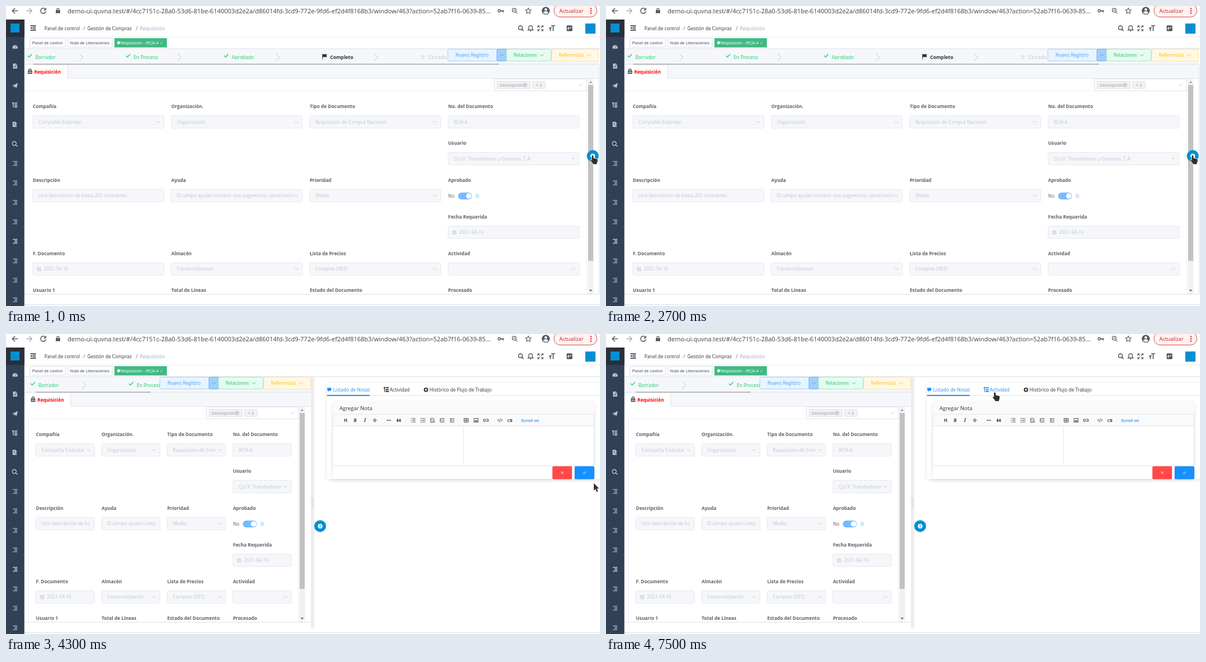
Animation, 1052 px wide and 532 px high, one loop 8000 ms. Source, as an HTML page with a canvas:

```html
<!DOCTYPE html>
<html lang="es">
<head>
<meta charset="utf-8">
<title>Requisición</title>
<style>
html, body { margin: 0; width: 100%; height: 100%; overflow: hidden; background: #fff; }
canvas { display: block; }
</style>
</head>
<body>
<canvas id="stage" width="1052" height="532"></canvas>
<script>
const ctx = document.getElementById('stage').getContext('2d');
const LOOP = 8000;
const SANS = '"Open Sans", "Noto Sans", sans-serif';
const ARIAL = '"Liberation Sans", Arial, sans-serif';
const BLUE = '#1890ff', GREEN = '#13ce66', AMBER = '#ffba00', ACCENT = '#008fd3';
const INK = '#303133', GREY = '#606266', PALE = '#c0c4cc', LINE = '#e4e7ed', WASH = '#f5f7fa';

// ---------- helpers ----------
function text(s, x, cy, color, size = 8.3, weight = 400, family = SANS) {
  ctx.font = `${weight} ${size}px ${family}`;
  ctx.fillStyle = color;
  ctx.fillText(s, x, cy + size * 0.36);
}

function box(x, y, w, h, fill, stroke, r = 0) {
  ctx.beginPath();
  ctx.roundRect(x, y, w, h, r);
  if (fill) { ctx.fillStyle = fill; ctx.fill(); }
  if (stroke) { ctx.strokeStyle = stroke; ctx.lineWidth = 1; ctx.stroke(); }
}

function disc(x, y, r, fill) {
  ctx.beginPath();
  ctx.arc(x, y, r, 0, 7);
  ctx.fillStyle = fill;
  ctx.fill();
}

function at(x, y, draw) {
  ctx.save();
  ctx.translate(x, y);
  draw();
  ctx.restore();
}

const pen = (d, x, y, color, width = 1) => at(x, y, () => {
  ctx.strokeStyle = color;
  ctx.lineWidth = width;
  ctx.stroke(new Path2D(d));
});

const blot = (d, x, y, color) => at(x, y, () => {
  ctx.fillStyle = color;
  ctx.fill(new Path2D(d));
});

function clipped(x, y, w, h, draw) {
  ctx.save();
  ctx.beginPath();
  ctx.rect(x, y, w, h);
  ctx.clip();
  draw();
  ctx.restore();
}

function card(x, y, w, h) {
  ctx.save();
  ctx.shadowColor = 'rgba(0,0,0,.11)';
  ctx.shadowBlur = 7.4;
  ctx.shadowOffsetY = 1.2;
  box(x, y, w, h, '#fff', null, 2);
  ctx.restore();
}

// ---------- icons ----------
const CHEVRON = 'M-3.2 -1.6L0 1.6L3.2 -1.6';
const CHECK = 'M-3.6 0L-1 2.6L3.8 -2.8';
const CROSS = 'M-2 -2L2 2M2 -2L-2 2';
const LENS = 'M2.6 -.9A3.5 3.5 0 1 1 -4.4 -.9A3.5 3.5 0 1 1 2.6 -.9M1.6 1.6L4.8 4.8';
const LIST = 'M-4 -3.5H4M-1 -1.2H4M-1 1.2H4M-4 3.5H4';
const CALENDAR = 'M-3 -2.5H3V3.2H-3ZM-3 -.5H3M-1.5 -3.5V-2M1.5 -3.5V-2M-1.5 1.3H1.5';
const LINES = 'M-1.5 -3H4M-1.5 0H4M-1.5 3H4M-4 -3H-2.8M-4 0H-2.8M-4 3H-2.8';

const chevron = (x, y, color) => pen(CHEVRON, x, y, color, 0.9);

function lock(x, y, color) {
  pen('M-2 0V-1.8A2 2 0 0 1 2 -1.8V0', x, y, color, 1.2);
  pen('M-3.1 0H3.1V4H-3.1ZM0 1V3', x, y, color, 1.3);
}

function tree(x, y, color) {
  pen('M-3 -3.5V3.4H0M-3 .1H0', x, y, color, 1);
  blot('M-4.5 -4.6H-1.4V-2.4H-4.5ZM-.4 -4.4H4.5V-2.4H-.4ZM-.4 -.9H4.5V1.1H-.4ZM-.4 2.4H4.5V4.4H-.4Z', x, y, color);
}

function infoBadge(x, y) {
  disc(x, y, 10.5, ACCENT);
  disc(x, y, 4.2, '#fff');
  blot('M-.7 -.6H.7V2.5H-.7ZM-.7 -2.6H.7V-1.3H-.7Z', x, y, ACCENT);
}

// ---------- browser bar ----------
const ADDRESS = 'demo-ui.quvna.test/#/4cc7151c-28a0-53d6-81be-6140003d2e2a/' +
  'd86014fd-3cd9-772e-9fd6-ef2d4f8168b3/window/463?action=52ab7f16-0639-85...';

function browserBar() {
  const ink = '#54585d', red = '#c5221f';
  pen('M5 0H-4.5M0 -4.8L-4.8 0L0 4.8', 16, 8.5, ink, 1.5);
  pen('M-5 0H4.5M0 -4.8L4.8 0L0 4.8', 41, 8.5, '#a9acb0', 1.5);
  pen('M3.6 -3A4.7 4.7 0 1 0 4.6 1M4.6 -5V-1.6H1', 66, 8.5, ink, 1.5);
  lock(92, 8, ink);
  blot('M-3.1 0H3.1V4H-3.1Z', 92, 8, ink);
  text(ADDRESS, 109, 8.7, '#3c4043', 11);
  pen('M-.2 0A2.2 2.2 0 1 1 -4.6 0A2.2 2.2 0 1 1 -.2 0H5V2.5M2.7 0V2.3', 876, 8.5, ink, 1.5);
  pen(LENS + 'M-2.5 -.9H.7', 901, 8.5, ink, 1.2);
  pen('M0 -5L1.5 -1.6L5 -1.3L2.4 1.1L3.2 4.7L0 2.8L-3.2 4.7L-2.4 1.1L-5 -1.3L-1.5 -1.6Z', 925, 8.5, ink, 1.1);
  disc(956, 8.5, 7, ink);
  disc(956, 6.2, 2.3, '#fff');
  blot('M-4.3 4A4.3 3.3 0 0 1 4.3 4Q0 7.6 -4.3 4Z', 956, 8.5, '#fff');
  box(970.5, -3, 76, 22.5, '#fef2f1', '#d4504b', 11);
  text('Actualizar', 980, 8.7, red, 9.4);
  [-4, 0, 4].forEach(d => disc(1036, 8.5 + d, 1.2, red));
}

// ---------- sidebar ----------
function sidebar() {
  box(0, 24, 32.5, 508, '#304156');
  box(0, 24, 32.5, 30.8, '#2b2f3a');
  box(8, 31, 16, 16, ACCENT);
  const c = '#bfcbd9', row = i => 72 + 34.53 * i;
  blot('M-4.3 3.4A4.6 4.6 0 1 1 4.3 3.4Z', 16, row(0), c);
  pen('M0 1.6L2 -2M-2.8 .8H-2M2.4 1H3', 16, row(0), '#304156', 0.9);
  blot('M-3.5 -4.5H1.5L3.8 -2.2V4.5H-3.5Z', 16, row(1), c);
  pen('M-2 0H2.2M-2 2H2.2M1.2 -4V-1.9H3.5', 16, row(1), '#304156', 0.8);
  blot('M-4.8 .2L4.8 -4.4L2.8 4L-.4 2.2L-1.8 4.4V1.4L2.6 -2.2L-2.6 1.2Z', 16, row(2), c);
  tree(15.5, row(3), c);
  blot('M-3.8 -4.5H1.2L3.2 -2.5V4.3H-3.8Z', 15.5, row(4), c);
  pen('M-2.2 -1.6H1M-2.2 .5H.4M.2 3.2L4.3 -.6', 15.5, row(4), '#304156', 0.9);
  pen(LENS, 15.5, row(5), c, 1.3);
  for (let i = 6; i < 14; i++) pen(LIST, 16, row(i), i === 10 ? '#fff' : c, 1);
}

// ---------- top of the page ----------
function navbar() {
  pen('M-5 -4H5M-1.2 -1.3H5M-1.2 1.3H5M-5 4H5', 48, 39, INK, 1.3);
  blot('M-5 0L-2.2 -2V2Z', 48, 39, INK);
  text('Panel de control', 68, 39.7, INK);
  text('/', 137, 39.7, GREY);
  text('Gestión de Compras', 144, 39.7, INK);
  text('/', 230, 39.7, GREY);
  text('Requisición', 237, 39.7, '#97a8be');

  const ink = '#4a4f57';
  pen(LENS, 912, 39.5, ink, 1.5);
  pen('M-4.5 3H4.5L3.2 1V-1.4A3.2 3.2 0 0 0 -3.2 -1.4V1ZM-1.2 4.8H1.2M0 -5.6V-4.6', 929, 39.5, ink, 1.3);
  pen('M-1.2 -1.2L-4.3 -4.3M1.2 -1.2L4.3 -4.3M-1.2 1.2L-4.3 4.3M1.2 1.2L4.3 4.3' +
      'M-4.5 -1.8V-4.5H-1.8M1.8 -4.5H4.5V-1.8M-4.5 1.8V4.5H-1.8M1.8 4.5H4.5V1.8', 946.5, 39.5, ink, 1.2);
  pen('M-5.5 -.8H-.5M-3 -.8V5M-1.5 -4.5H5.5M2 -4.5V5', 967, 39.5, ink, 1.5);
  box(993, 34.5, 10, 10, ink, null, 1);
  text('A', 994, 40, '#fff', 6.5, 700);
  pen('M-1.5 -1H1.5M0 -2V-1L-1.4 2M-1 -.5L1.4 2', 1000.5, 38.5, '#fff', 0.6);
  box(1026, 31, 18, 18, ACCENT);

  box(33, 54.5, 1019, 1, '#eceef1');
  box(42.5, 57.5, 62.5, 15.5, '#fff', '#d8dce5');
  text('Panel de control', 46.5, 65.2, '#495060', 7.4, 400, ARIAL);
  box(109.5, 57.5, 78.5, 15.5, '#fff', '#d8dce5');
  text('Nota de Liberaciones', 113.3, 65.2, '#495060', 7.4, 400, ARIAL);
  box(192, 57, 93, 16.4, '#42b983');
  disc(199.5, 65.2, 2.6, '#fff');
  text('Requisición - RCN-4', 203, 65.2, '#fff', 7.4, 400, ARIAL);
  pen('M-1.2 -1.2L1.2 1.2M1.2 -1.2L-1.2 1.2', 275, 66, '#d8f2e6', 0.7);
  box(33, 75.3, 1019, 1, '#d8dce5');
}

// ---------- record window ----------
function steps(right, pad) {
  box(33, 76.5, right - 33, 27, WASH);
  clipped(33, 76, right - 33, 27, () => {
    ['Borrador', 'En Proceso', 'Aprobado', 'Completo', 'Cerrado'].forEach((name, i) => {
      const x = 42 + pad + 174 * i;
      if (i < 3) pen(CHECK, x, 88, GREEN, 1.3);
      if (i === 3) {
        blot('M-3 -4H4.5L3.5 -1.5L4.5 1H-3Z', x, 89.5, INK);
        pen('M-3.3 -4.5V5', x, 89.5, INK, 1);
      }
      if (i === 4) pen('M-3.5 -3L-.5 0L-3.5 3M0 -3L3 0L0 3', x, 90.5, PALE, 1);
      text(name, x + 10, 91.2, i < 3 ? GREEN : i === 3 ? INK : PALE, 8.5, i === 3 ? 700 : 400);
      if (i < 4) pen('M-3.5 -6.5L3.2 0L-3.5 6.5', x + 91, 91, PALE, 1);
    });
  });
}

function actions(right) {
  const x = right - 267.5, y = 76.5, h = 21;
  box(x, y, 87, h, '#e8f4ff', '#a3d3ff', 2);
  text('Nuevo Registro', x + 13.5, 87.2, '#3c9cff');
  box(x + 87, y, 17, h, '#a3cffb', '#6aaff5', 1);
  chevron(x + 95.5, 87.2, '#4f94d8');
  box(x + 104, y, 79, h, '#e7faf0', '#a1ebc2', 2);
  text('Relaciones', x + 116.5, 87.2, GREEN);
  chevron(x + 166.5, 87.2, GREEN);
  box(x + 184, y, 83, h, '#fff8e6', '#ffe399', 2);
  text('Referencias', x + 196.5, 87.2, AMBER);
  chevron(x + 250, 87.2, AMBER);
}

function filter(right) {
  const x = right - 185;
  box(x + .5, 129.5, 163, 21, '#fff', '#dcdfe6', 2);
  box(x + 4.5, 133.5, 59.5, 13, '#f1f1f3', '#e2e3e6', 2);
  text('Descripción', x + 9.5, 140, '#909399', 7.4);
  disc(x + 54, 140, 3.6, PALE);
  pen('M-1.4 -1.4L1.4 1.4M1.4 -1.4L-1.4 1.4', x + 54, 140, '#fff', 0.8);
  box(x + 67.5, 133.5, 22.5, 13, '#f1f1f3', '#e2e3e6', 2);
  text('+ 3', x + 73.5, 140, '#909399', 7.4);
  chevron(x + 153, 140, PALE);
}

// [label, value, kind, column, label centre]
const FIELDS = [
  ['Compañía', 'Compañía Estándar', 'select', 0, 178],
  ['Organización.', 'Organización', 'select', 1, 178],
  ['Tipo de Documento', 'Requisición de Compra Nacional', 'select', 2, 178],
  ['No. del Documento', 'RCN-4', 'input', 3, 178],
  ['Usuario', 'Q.U.V. Tramitadoras y Gestoras, C.A.', 'select', 3, 243],
  ['Descripción', 'Una descripción de hasta 255 caracteres.', 'input', 0, 308.5],
  ['Ayuda', 'El campo ayuda contiene una sugerencia; comentario o instrucción', 'input', 1, 308.5],
  ['Prioridad', 'Media', 'select', 2, 308.5],
  ['Aprobado', '', 'switch', 3, 308.5],
  ['Fecha Requerida', '2021-04-16', 'date', 3, 373.5],
  ['F. Documento', '2021-04-16', 'date', 0, 438.5],
  ['Almacén', 'Comercialización', 'select', 1, 438.5],
  ['Lista de Precios', 'Compras (VES)', 'select', 2, 438.5],
  ['Actividad', '', 'select', 3, 438.5],
  ['Usuario 1', '', 'none', 0, 503.5],
  ['Total de Líneas', '', 'none', 1, 503.5],
  ['Estado del Documento', '', 'none', 2, 503.5],
  ['Procesado', '', 'none', 3, 503.5]
];

function field([label, value, kind, col, ly], left, gap, width) {
  const x = left + gap * col, cy = ly + 27.7;
  text(label, x, ly + .2, GREY, 8.3, 700);
  if (kind === 'none') return;
  if (kind === 'switch') {
    const sy = cy + .7;
    text('No', x, sy, GREY);
    box(x + 17.6, sy - 6.1, 24.7, 12.3, '#74bcff', null, 6.1);
    disc(x + 36.6, sy, 4.9, '#fff');
    text('Si', x + 48.3, sy, '#5db1ff');
    return;
  }
  box(x, cy - 11, width, 22, WASH, LINE, 2.5);
  const inset = kind === 'date' ? 19.5 : 10;
  if (kind === 'date') pen(CALENDAR, x + 11, cy + .3, PALE, 0.8);
  if (kind === 'select') chevron(x + width - 10.5, cy, PALE);
  const end = width - (kind === 'select' ? 18 : 9);
  clipped(x, cy - 10, end, 20, () => text(value, x + inset, cy + .3, PALE));
}

function recordWindow(split, thumbHover) {
  const right = split ? 540 : 1050, pad = split ? 5.5 : 0;
  steps(right, pad);
  actions(right);

  box(33, 103, right - 33, 25.5, WASH);
  box(33, 102.8, right - 33, 1, '#dcdfe6');
  box(48 + pad, 102.5, (split ? 256 : 873) - 48 - pad, 1.6, '#a3a5a8');
  box(33, 128, right - 33, 1, LINE);
  box(33, 104.5, 76 + pad, 25, '#fff');
  box(108.5 + pad, 104.5, 1, 24, '#dcdfe6');
  lock(42.5 + pad, 115.5, INK);
  text('Requisición', 50 + pad, 116.7, '#f00', 8.2, 700);

  const cardLeft = split ? 39.5 : 34.5;
  pen(`M${cardLeft} 511V150.5H${right - 22}V511`, 0, 0, '#ebeef5');
  filter(right);
  clipped(33, 129, right - 33, 382, () => {
    const layout = split ? [53, 116.3, 103.5] : [47.5, 245.2, 232];
    FIELDS.forEach(f => field(f, ...layout));
  });

  const bar = right - (split ? 20.5 : 19.5);
  box(bar, 129.5, 10, 381, '#f1f1f1');
  box(bar + .5, 140, 9, 312, thumbHover ? '#a8a8a8' : '#c1c1c1');
  blot('M-2.5 1.2L0 -1.5L2.5 1.2Z', bar + 5, 135, '#8a8a8a');
  blot('M-2.5 -1.2L0 1.5L2.5 -1.2Z', bar + 5, 504.5, '#444');
  box(33, 510.5, right - 33, 1, '#dcdfe6');
  box(right, 104, 1, 407, '#dcdfe6');
}

// ---------- notes panel ----------
function toolbar() {
  const y = 153, c = '#444';
  text('H', 598.5, y, c, 8, 700);
  text('B', 615.8, y, c, 8, 700);
  text('I', 634, y, c, 8, 'italic 600', '"Noto Serif", serif');
  text('S', 651, y, c, 8, 600);
  pen('M-4 0H4', 653.5, y, c, 0.8);
  pen('M-4 0H4', 678, y, c, 1.2);
  blot('M-3.6 .2Q-3.4 -2.8 -.8 -3L-1.8 -.5H-.6V2.6H-3.6ZM.6 .2Q.8 -2.8 3.4 -3L2.4 -.5H3.6V2.6H.6Z', 695.7, y, c);
  pen(LINES, 721, y, c, 1.1);
  pen('M-1.5 -3H4M-1.5 0H4M-1.5 3H4M-3.4 -4.2V-1.6M-4.2 .3H-2.6V2M-4.2 4H-2.6', 738.5, y, c, 0.9);
  pen('M3 0V3.3H-3.5V-3.2H2M-2 -.6L-.3 1.2L4 -3', 755.5, y, c, 1);
  pen('M-4 -3H4M0 0H4M-4 3H4', 772.5, y, c, 1);
  blot('M-4 -2L-1.3 0L-4 2Z', 772.5, y, c);
  pen('M-4 -3H4M0 0H4M-4 3H4', 790, y, c, 1);
  blot('M-1.3 -2L-4 0L-1.3 2Z', 790, y, c);
  pen('M-3.7 -3.2H3.7V3.2H-3.7ZM-3.7 0H3.7M0 -3.2V3.2', 815, y, c, 1);
  pen('M-3.7 -3.2H3.7V3.2H-3.7Z', 832.5, y, c, 1);
  blot('M-2.8 2.2L-1 -.2L.4 1L1.6 -.6L2.9 2.2Z', 832.5, y, c);
  pen('M-.8 -2H-2.4A2 2 0 0 0 -2.4 2H-.8M.8 -2H2.4A2 2 0 0 1 2.4 2H.8M-1.8 0H1.8', 850, y, c, 1.1);
  pen('M-2 -2.4L-4.4 0L-2 2.4M2 -2.4L4.4 0L2 2.4M.8 -3L-.8 3', 875, y, c, 1);
  text('CB', 887.7, y, c, 7, 700);
  text('Scroll on', 912, y, '#4b96e6', 7.5, 700, ARIAL);
}

function notes(activityHover) {
  card(568.5, 87, 490, 170);
  box(568.5, 108.8, 484, 1, '#dfe4ed');
  box(568.5, 108, 75.5, 2, BLUE);
  blot('M-3.5 -3H3.5V2H0L-2 4V2H-3.5Z', 572.5, 98.5, BLUE);
  text('Listado de Notas', 579.5, 99.2, BLUE);
  const act = activityHover ? BLUE : INK;
  tree(673.3, 98.7, act);
  text('Actividad', 679.5, 99.2, act);
  disc(743.8, 98.8, 3.9, INK);
  pen('M-2.2 0H2.2M0 -2.2V2.2', 743.8, 98.8, '#fff', 1.2);
  text('Histórico de Flujo de Trabajo', 750, 99.2, INK);

  card(578.5, 121, 463.5, 136);
  box(578.5, 121, 463.5, 21.5, '#fafafb');
  text('Agregar Nota', 590.5, 132, INK, 9.45);
  box(578.5, 142.5, 463, 20.5, '#f9fafc', '#e5e5e5');
  toolbar();
  box(578.5, 163, 463, 71, '#fff', '#e1e3e8');
  box(810, 163, 1, 71, '#e5e5e5');
  box(967.7, 234.5, 34.7, 23, '#ff4949', null, 2);
  pen(CROSS, 985, 245.8, '#fff', 0.9);
  box(1007, 234.5, 35, 23, BLUE, null, 2);
  pen('M-3 0L-.8 2.2L3.2 -2.2', 1024.5, 245.8, '#fff', 0.9);
}

// The panel slides in half transparent over white.
function enteringNotes() {
  at(2.5, 0, () => notes(false));
  box(547, 77, 505, 195, 'rgba(255,255,255,.45)');
}

function splitter() {
  box(540, 76.5, 6, 445, '#ededee');
  for (let i = 0; i < 7; i++) {
    disc(541.8, 291 + 2.7 * i, 0.6, '#b8b8b8');
    disc(544.2, 291 + 2.7 * i, 0.6, '#b8b8b8');
  }
}

// ---------- pointer ----------
const ARROW = 'M0 0V13L3 10.4L5.2 15.5L7.4 14.5L5.3 9.7L9.2 9.4Z';
const HAND = 'M-1.5 1Q0 -1 1.5 1V5.2Q3 4.4 4 5.6Q5.4 5 6.4 6.3Q8 5.8 8.6 7.4V10.5' +
  'Q8.4 12.4 7.4 13.4V15.6H.4V14Q-1.6 12.3 -3.8 8.6Q-3.6 6.8 -1.5 8.4Z';
// [ms, x, y, hand]
const PATH = [
  [0, 1039, 265, 1], [500, 985, 272], [600, 850, 262], [700, 700, 238], [800, 540, 200],
  [900, 400, 155], [1000, 324.5, 131.5], [1100, 308, 150], [1200, 360, 205], [1300, 473, 247],
  [1400, 741, 257.5], [2200, 1020, 295.5], [2300, 1034, 283], [2500, 1042, 275], [2700, 1039, 265, 1],
  [3800, 1041, 264.5], [5600, 778, 283], [5900, 612, 128.5], [6200, 631, 156], [6300, 621, 98],
  [6500, 623.5, 98, 1], [6900, 668, 104, 1], [7100, 676, 106, 1], [7200, 685, 106, 1],
  [7400, 687, 105, 1], [7500, 688.5, 103.5, 1]
];

function pointer(t) {
  const [, x, y, hand] = PATH.findLast(p => p[0] <= t);
  const shape = hand ? HAND : ARROW;
  pen(shape, x, y, 'rgba(255,255,255,.9)', 1.6);
  blot(shape, x, y, '#303030');
}

// ---------- scene ----------
function draw(t) {
  const split = t >= 4000;
  ctx.fillStyle = '#fff';
  ctx.fillRect(0, 0, 1052, 532);
  browserBar();
  navbar();
  recordWindow(split, t >= 2500 && t < 2700);
  if (split) {
    if (t < 4300) enteringNotes();
    else notes(t >= 6900);
    splitter();
    infoBadge(556.4, 340.7);
  } else {
    infoBadge(1039.2, 266);
  }
  box(33, 529, 1019, 1, '#d8dce5');
  sidebar();
  pointer(t);
}

const start = performance.now();
function tick() {
  draw((performance.now() - start) % LOOP);
  requestAnimationFrame(tick);
}
tick();
</script>
</body>
</html>
```
